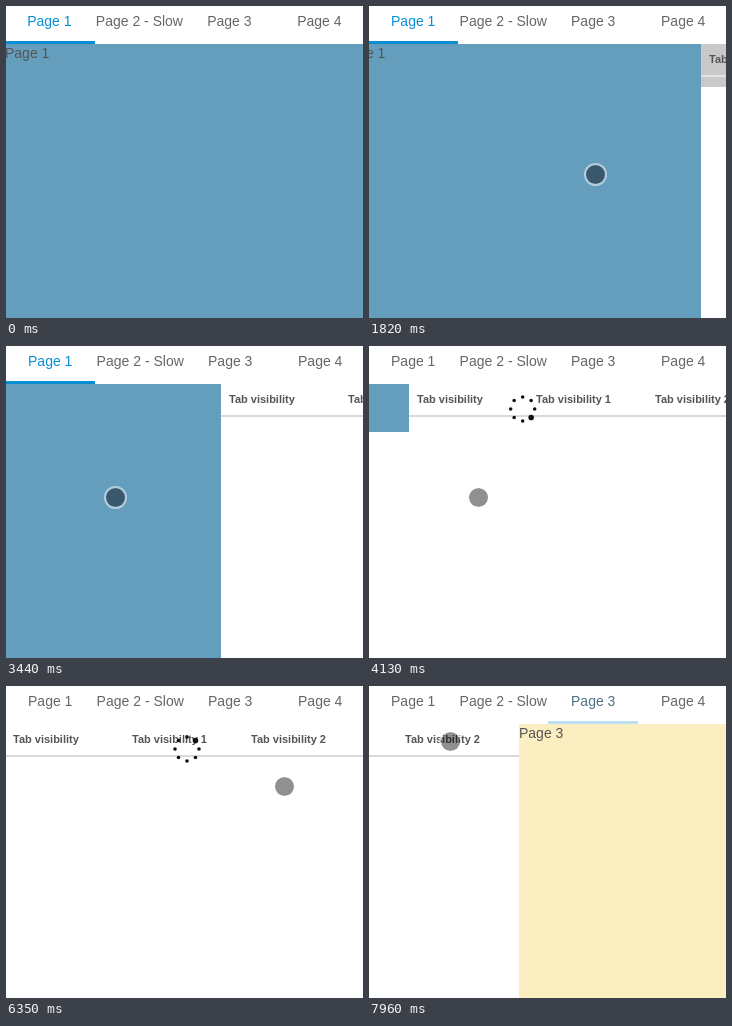
Recreate the animation shown at these times as an HTML page with a canvas. Size 357 px wide and 312 px high, loop 8000 ms.

```html
<!DOCTYPE html>
<html lang="en">
<head>
<meta charset="utf-8">
<title>Swipe between pages</title>
<style>
html, body { margin: 0; width: 100%; height: 100%; overflow: hidden; background: #fff; }
canvas { display: block; }
</style>
</head>
<body>
<canvas id="stage" width="357" height="312"></canvas>
<script>
const ctx = document.getElementById('stage').getContext('2d');
const W = 357, H = 312, LOOP = 8000;
const HEADER = 38, PAGE_W = 360, TAB_W = PAGE_W / 4, SHORT_PAGE = 86;
const APPEAR = 270, FIRST_DRAG = 1430, LOADED = 2200, FIRST_RELEASE = 3877;
const SECOND_DRAG = 6890, SECOND_RELEASE = 7902;
const SNAP = 500, FADE = 220;
const GREY = [102, 102, 102], WHITE = [255, 255, 255], ACCENT = [8, 142, 211];

// The pointer rests between these moves
const moves = [
  { from: APPEAR, to: 730, x: 255, y: 175 },
  { from: FIRST_DRAG, to: 1970, x: 215, y: 166 },
  { from: LOADED, to: 2900, x: 156, y: 150 },
  { from: 2900, to: 3440, x: 109, y: 151 },
  { from: 4200, to: 5250, x: 269, y: 118 },
  { from: 6120, to: 6500, x: 284, y: 88 },
  { from: 6500, to: SECOND_DRAG, x: 268, y: 54 },
  { from: SECOND_DRAG, to: 7700, x: 81, y: 55 }
];

const clamp = v => Math.max(0, Math.min(1, v));
const lerp = (a, b, p) => a + (b - a) * p;
const mix = (a, b, p) => `rgb(${a.map((v, i) => Math.round(lerp(v, b[i], p)))})`;

// cubic-bezier(.25, .1, .25, 1)
function ease(p) {
  if (p <= 0 || p >= 1) return clamp(p);
  const bez = (a, b, u) => 3 * a * u * (1 - u) ** 2 + 3 * b * u * u * (1 - u) + u ** 3;
  let lo = 0, hi = 1;
  for (let i = 0; i < 20; i++) {
    const mid = (lo + hi) / 2;
    if (bez(.25, .25, mid) < p) lo = mid; else hi = mid;
  }
  return bez(.1, 1, lo);
}

function pointerAt(t) {
  let x = 272, y = 280;
  for (const move of moves) {
    const p = clamp((t - move.from) / (move.to - move.from));
    x = lerp(x, move.x, p);
    y = lerp(y, move.y, p);
  }
  return { x: Math.round(x), y: Math.round(y) };
}

// Left edge of the second page
function edgeAt(t, pointer) {
  if (t < FIRST_DRAG) return 359;
  if (t < FIRST_RELEASE) return Math.min(359, pointer.x + 106);
  if (t < SECOND_DRAG) return lerp(215, -1, ease((t - FIRST_RELEASE) / SNAP));
  if (t < SECOND_RELEASE) return pointer.x - 269;
  return lerp(-188, -361, ease((t - SECOND_RELEASE) / SNAP));
}

function rect(x, y, w, h, color) {
  ctx.fillStyle = color;
  ctx.fillRect(x, y, w, h);
}

function text(str, x, y, color, font = '14px', align = 'left') {
  ctx.font = `${font} "Liberation Sans", Arial, sans-serif`;
  ctx.textAlign = align;
  ctx.fillStyle = color;
  ctx.fillText(str, x, y);
}

function disc(x, y, r, color) {
  ctx.fillStyle = color;
  ctx.beginPath();
  ctx.arc(x, y, r, 0, 7);
  ctx.fill();
}

function drawHeader(t) {
  rect(0, 0, W, HEADER, '#fff');
  const nudge = t < FIRST_DRAG ? -0.8 : 0;
  const active = {
    'Page 1': 1 - clamp((t - FIRST_RELEASE) / FADE),
    'Page 3': clamp((t - SECOND_RELEASE) / FADE)
  };
  ['Page 1', 'Page 2 - Slow', 'Page 3', 'Page 4'].forEach((label, i) => {
    const left = i * TAB_W - 1, amount = active[label] || 0;
    text(label, left + TAB_W / 2 + 0.2 + nudge, 20, mix(GREY, ACCENT, amount), '14px', 'center');
    if (amount) rect(left, 35, TAB_W, 3, mix(WHITE, ACCENT, amount));
  });
}

function drawColorPage(label, x, height, color) {
  rect(x, HEADER, PAGE_W, height - HEADER, color);
  text(label, x, 52, '#555');
}

function drawTabsPage(x, loading) {
  rect(x, HEADER, PAGE_W, H - HEADER, '#fff');
  if (loading) rect(x, HEADER, PAGE_W, 43, '#c9c9c9');
  rect(x, 69, PAGE_W, 2, loading ? '#e4e4e4' : '#d9d9d9');
  ['Tab visibility', 'Tab visibility 1', 'Tab visibility 2'].forEach((label, i) =>
    text(label, x + 8 + i * 119, 57, '#555', 'bold 11px'));
}

function drawSpinner(t, x, y) {
  const head = Math.floor((t + 170) / 100) % 8;
  for (let i = 0; i < 8; i++) {
    const angle = i * Math.PI / 4;
    disc(x + 12 * Math.sin(angle), y - 12 * Math.cos(angle), i === head ? 2.8 : 1.8, '#111');
  }
}

function drawPointer({ x, y }) {
  disc(x + 0.5, y + 0.5, 9.6, 'rgba(0,0,0,.435)');
  ctx.strokeStyle = 'rgba(255,255,255,.5)';
  ctx.lineWidth = 2;
  ctx.beginPath();
  ctx.arc(x + 0.5, y + 0.5, 10.5, 0, 7);
  ctx.stroke();
}

function draw(t) {
  const pointer = pointerAt(t);
  const edge = Math.round(edgeAt(t, pointer));
  rect(0, 0, W, H, '#fff');
  drawTabsPage(edge, t < LOADED);
  drawColorPage('Page 1', edge - PAGE_W, t < FIRST_RELEASE ? H : SHORT_PAGE, '#659dbd');
  drawColorPage('Page 3', edge + PAGE_W, t < SECOND_RELEASE ? SHORT_PAGE : H, '#fbeec1');
  if (t >= FIRST_RELEASE) {
    // The spinner drifts in while the page settles, then travels with it
    drawSpinner(t, t < SECOND_DRAG ? 181 - (edge + 1) * 2 / 3 : edge + 182, 63);
  }
  drawHeader(t);
  if (t >= APPEAR) drawPointer(pointer);
}

const start = performance.now();
function tick() {
  draw((performance.now() - start) % LOOP);
  requestAnimationFrame(tick);
}
tick();
</script>
</body>
</html>
```
